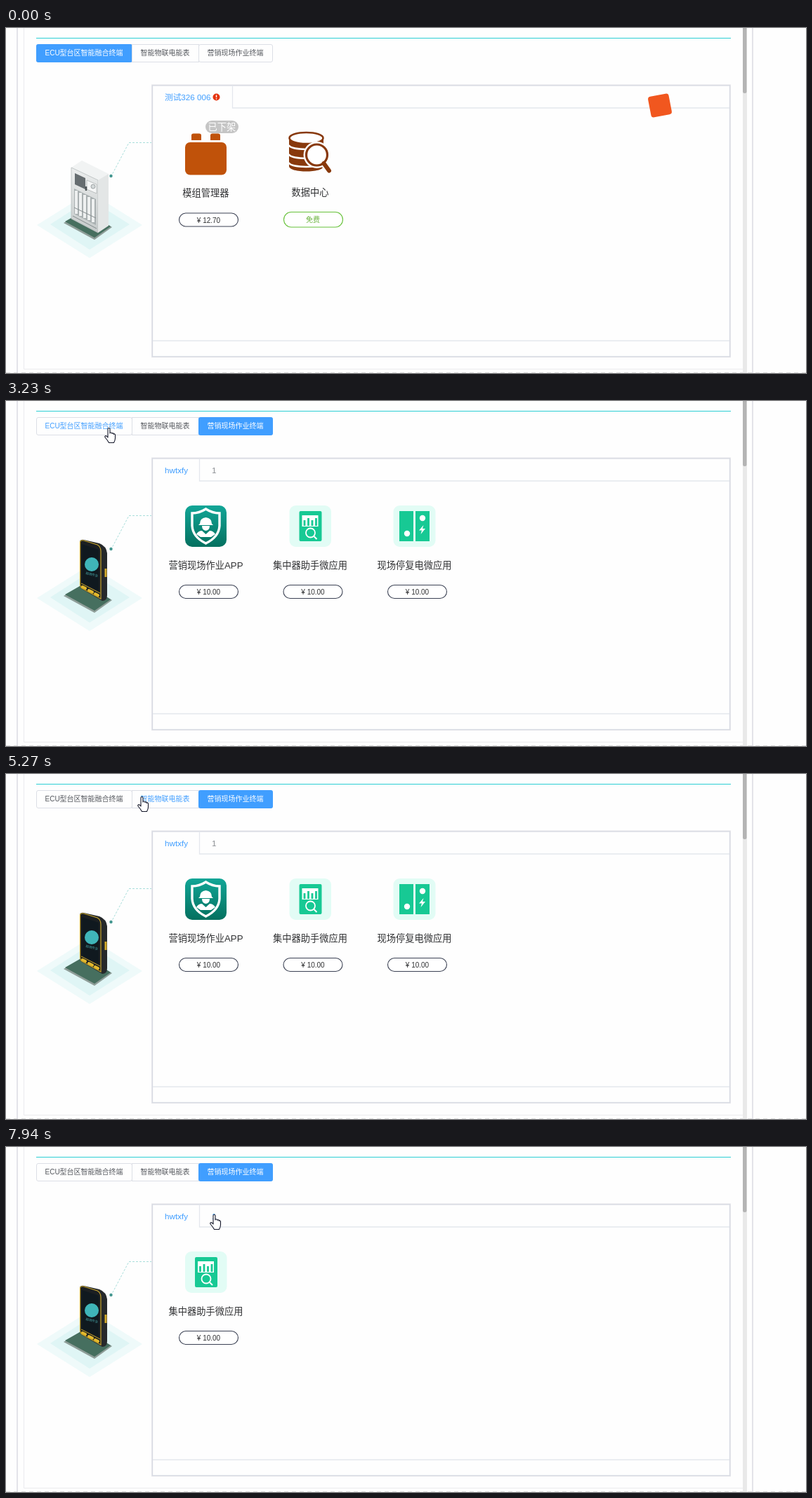
An HTML page that plays this animation: 1139x492 px, repeating every 8 s.

```html
<!DOCTYPE html>
<html lang="zh-CN">
<head>
<meta charset="utf-8">
<title>终端应用</title>
<style>
html, body { margin: 0; width: 100%; height: 100%; overflow: hidden; background: #fefefe; }
svg { display: block; width: 1139px; height: 492px; }
text { font-family: "Liberation Sans", "Noto Sans CJK SC", sans-serif; fill: #303133; }
.s { font-size: 10px; }
.m { font-size: 11.67px; }
.l { font-size: 13.25px; }
.c { text-anchor: middle; }
.line { fill: none; stroke: #e4e7ed; }
.faint { fill: none; stroke: #ebebee; }
.teal { stroke: #2ccfd3; }
.pill { fill: #fff; stroke: #3c4254; stroke-width: 1.1; }
.blue { fill: #409eff; }
.green { fill: #17c994; }
.box { fill: #fefefe; stroke: #c3c3c3; }
.cur { fill: #fff; stroke: #15182a; stroke-width: 1.1; stroke-linejoin: round; }
</style>
</head>
<body>
<svg viewBox="0 0 1139 492">
<defs>
  <linearGradient id="shade" x2="0" y2="1"><stop stop-color="#12a697"/><stop offset="1" stop-color="#04705f"/></linearGradient>
  <linearGradient id="steel" x2="0" y2="1"><stop stop-color="#eceeee"/><stop offset="1" stop-color="#c5caca"/></linearGradient>
  <g id="db">
    <path d="M.5 9v40c0 10 49 10 49 0V9z" fill="#88390c"/>
    <ellipse cx="25" cy="9" rx="24" ry="8" fill="#fff" stroke="#88390c" stroke-width="2.6"/>
    <path d="M0 19c4 8 46 8 50 0M0 32c4 8 46 8 50 0M0 44c4 8 46 8 50 0" fill="none" stroke="#fff" stroke-width="2.4"/>
    <path d="M50 44L58 56" stroke="#fff" stroke-width="11"/>
    <circle cx="40" cy="33" r="19" fill="#fff"/>
    <circle cx="40" cy="33" r="15" fill="#fff" stroke="#88390c" stroke-width="3.2"/>
    <path d="M50 45L57.500 55.500" stroke="#88390c" stroke-width="6" stroke-linecap="round"/>
  </g>
  <g id="call">
    <path d="M10 54Q44 47 53 11" fill="none" stroke="currentColor" stroke-width="10"/>
    <path d="M42 7L53 1Q58-1 60 3Q61 12 57 21L50 26Q43 23 41 11Z"/>
    <path d="M1 51L11 41Q14 39 17 41L26 48Q22 57 10 60Q2 60 1 55Z"/>
  </g>
  <g id="none">
    <rect x=".5" y=".5" width="59" height="59" class="box"/>
    <rect x="2.500" y="2.500" width="12" height="12" class="box"/>
  </g>
  <g id="meter">
    <rect width="59.500" height="59" rx="9" fill="#e2fcf5"/>
    <rect x="14" y="8" width="32" height="43" rx="2" class="green"/>
    <path d="M18 14h23v16H18z" fill="#fff"/>
    <path d="M21.500 29V21M27 29V18M32.500 29V21M38 29V18" stroke="#17c994" stroke-width="2.800"/>
    <circle cx="30" cy="39" r="6.500" fill="none" stroke="#fff" stroke-width="1.800"/>
    <path d="M35 44l4 4" stroke="#fff" stroke-width="2"/>
  </g>
  <g id="price">
    <rect x="-42" y="-9.500" width="84" height="19" rx="9.500" class="pill"/>
    <text class="s c" y="4">¥ 10.00</text>
  </g>
  <g id="helper">
    <use href="#meter" x="-29.500" y="149"/>
    <text class="l c" y="238.500">集中器助手微应用</text>
    <use href="#price" y="272"/>
  </g>
</defs>

<rect width="1139" height="492" fill="#fefefe"/>
<path d="M16 0V492M1063 0V492" stroke="#e3e3e9" stroke-width="2"/>
<path d="M0 491.500H1139" stroke="#dedede" stroke-dasharray="6 5"/>
<path d="M43 14.500H1032" class="teal"/>
<rect x="1049" width="6" height="492" fill="#e9e9e9"/>
<rect id="thumb" x="1049" y="-10" width="5.500" rx="2.500" fill="#b4b4b4"/>

<g id="tabs"></g>

<!-- device -->
<path d="M44 281L119 234L194 281L119 328Z" fill="#effafa"/>
<path d="M63 280L119 244L176 280L119 316Z" fill="#dff5f5"/>
<path d="M208 163.500H175L150 211" fill="none" stroke="#a9dedb" stroke-dasharray="3 2"/>
<circle cx="149.500" cy="211" r="2.200" fill="#43968f"/>
<path d="M82 278L112 260L151 284L126 302Z" fill="#8e9d98"/>
<path d="M84 276L112 260L149 283L126 299Z" fill="#466f5f"/>
<g id="cabinet">
  <path d="M93 199L108 189L146 208L131 217Z" fill="#f1f3f3"/>
  <path d="M93 199L131 217V292L93 272Z" fill="url(#steel)" stroke="#b5bcbc" stroke-width=".8"/>
  <path d="M131 217L146 208V282L131 292Z" fill="#e3e6e6"/>
  <path d="M98 207L113 214V230L98 223Z" fill="#666d70"/>
  <path d="M115 217L129 223V236L115 230Z" fill="#f5f6f6" stroke="#a6adad" stroke-width=".7"/>
  <circle cx="124" cy="226" r="3" fill="#d4d9d9" stroke="#848b8d" stroke-width=".7"/>
  <path d="M114 226v6" stroke="#4d5457" stroke-width="2.500"/>
  <path d="M97 229L128 244V281L97 265Z" fill="#a9b0b1"/>
  <path d="M100 232v33M106 235v33M112 238v33M118 241v33M124 244v33" stroke="#eef0f0" stroke-width="4"/>
  <path d="M97 256L128 271M95 268L129 286" stroke="#858c8e"/>
</g>
<g id="phone">
  <path d="M105 202Q105 197 111 198L133 203Q143 207 144 217V277Q144 285 137 285L108 268Q105 266 105 263Z" fill="#26292b"/>
  <path d="M105.500 201Q106 198 111 199L130 205Q135 208 135 214V282L108 267Q105.500 265 105.500 261Z" fill="#1b1f22" stroke="#c7a42c" stroke-width="1.200"/>
  <path d="M108 204L132 212V271L108 259Z" fill="#10191f"/>
  <path d="M107 260L134 274" stroke="#c7a42c"/>
  <circle cx="122" cy="233" r="10" fill="#3fb5b9"/>
  <text x="113" y="249" font-size="4.500" style="fill:#4aa9aa" transform="rotate(12 122 248)">现场作业</text>
  <path d="M109 265l4 2M118 270l5 2.500M127 275l4 2" stroke="#e4b92c" stroke-width="4" stroke-linecap="round"/>
  <path d="M142 239v12" stroke="#d2aa2c" stroke-width="3"/>
</g>

<!-- tall panel -->
<g id="full">
  <path d="M25.500 0V486.500H1049" class="faint"/>
  <rect x="208.500" y="82" width="822" height="386.500" fill="none" stroke="#e7e7ec" stroke-width="3"/>
  <rect x="208.500" y="82" width="822" height="386.500" fill="#fefefe" stroke="#d8dbe3" stroke-width="1.300"/>
  <path d="M209 446H1030" class="line" stroke-width="1.500"/>
</g>

<g id="ecu">
  <path d="M322.500 82V114H1030" class="line" stroke-width="1.300"/>
  <text x="226" y="103" class="m blue">测试326 006</text>
  <circle cx="299.500" cy="98.500" r="5" fill="#e5340e"/>
  <path d="M299.500 95.500v3.500M299.500 100.200v1.500" stroke="#fff" stroke-width="1.400"/>
  <path d="M264 160V153Q264 150.500 267 150.500H275Q278 150.500 278 153V160ZM291 160V153Q291 150.500 294 150.500H302Q305 150.500 305 153V160Z" fill="#c0520a"/>
  <rect x="255" y="163" width="59" height="46.500" rx="7" fill="#c0520a"/>
  <rect x="284" y="132" width="47" height="18" rx="9" fill="#c5c5c5"/>
  <text x="307.500" y="146" class="l c" style="fill:#fff">已下架</text>
  <text x="284.500" y="240" class="l c">模组管理器</text>
  <rect x="246.500" y="264" width="84" height="19" rx="9.500" class="pill"/>
  <text x="288.500" y="277.500" class="s c">¥ 12.70</text>
  <use href="#db" x="402.500" y="148"/>
  <text x="433" y="238.500" class="l c">数据中心</text>
  <rect x="395.500" y="262.500" width="84" height="21.500" rx="10.700" class="pill" style="stroke:#67c23a"/>
  <text x="437" y="277" class="s c" style="fill:#67b23a">免费</text>
</g>

<g id="field">
  <path d="M275.500 82V114H1030" class="line" stroke-width="1.300"/>
  <text x="226" y="103" class="m blue">hwtxfy</text>
  <text id="one" x="293" y="103" class="m">1</text>
  <g id="apps">
    <rect x="255" y="149" width="59" height="59" rx="10" fill="url(#shade)"/>
    <path d="M284.500 154Q294 160 304 160V178Q303 194 284.500 203Q266 194 265 178V160Q275 160 284.500 154Z" fill="none" stroke="#fff" stroke-width="3.400"/>
    <path d="M276 175Q276 167 284.500 166Q293 167 293 175L295 177H274Z" fill="#fff"/>
    <path d="M279 178H290Q290 184 284.500 185Q279 184 279 178ZM271 190Q274 185 279 185L284.500 190L290 185Q295 185 298 190L292 194H277Z" fill="#fff"/>
    <text x="284.500" y="238.500" class="l c">营销现场作业APP</text>
    <use href="#price" x="288.500" y="272"/>
    <use href="#meter" x="403.500" y="149"/>
    <text x="433" y="238.500" class="l c">集中器助手微应用</text>
    <use href="#price" x="437" y="272"/>
    <rect x="551.500" y="149" width="60" height="59" rx="9" fill="#e2fcf5"/>
    <path d="M560 157h20v43h-20zM583 157h20v43h-20z" class="green"/>
    <circle cx="571" cy="189" r="4.200" fill="#fff"/>
    <circle cx="593" cy="167" r="4.200" fill="#fff"/>
    <path d="M594.500 177L588 184.500H592L590.500 190L597 182H593Z" fill="#fff"/>
    <text x="581.500" y="238.500" class="l c">现场停复电微应用</text>
    <use href="#price" x="585.500" y="272"/>
  </g>
  <g id="solo">
    <use href="#meter" x="255" y="149"/>
    <text x="284.500" y="238.500" class="l c">集中器助手微应用</text>
    <use href="#price" x="288.500" y="272"/>
  </g>
</g>

<!-- empty panel and the list below it -->
<g id="empty">
  <path d="M25.500 0V345.500H1049" class="faint"/>
  <rect x="208" y="82" width="823" height="246" class="faint"/>
  <path d="M207.500 83H1031.500" stroke="#dcdde4" stroke-width="4"/>
  <path d="M208 86H1031" stroke="#ececf0" stroke-width="2"/>
  <path d="M26 363.500L38 357L36 368L32.500 366L30 368.500V364.500L35 360L29 364.500Z" fill="#303133"/>
  <text x="42" y="368" class="l" font-weight="500">最新上架</text>
  <path d="M25 386.500H1050" class="teal"/>
  <text x="67" y="418" class="l" font-weight="500">ECU型台区智能融合终端APP</text>
  <text x="961" y="419" class="m" style="fill:#505256">查看更多</text>
  <path d="M1014.500 409L1019.500 414L1014.500 419" fill="none" stroke="#777"/>
  <circle cx="116" cy="463" r="19.500" fill="#a9dcfa"/>
  <circle cx="116" cy="463" r="7" fill="#75c0ee"/>
  <path d="M75 437h41v51H75z" fill="#a3a5ea"/>
  <path d="M75 437h5v51h-5z" fill="#8d90df"/>
  <circle cx="95.500" cy="462" r="16.500" fill="#e9f0f2"/>
  <text x="95.500" y="468" class="c" font-size="17" font-weight="bold" style="fill:#4b5964" textLength="0">OS</text>
  <use href="#none" x="171" y="431"/>
  <use href="#none" x="267" y="431"/>
  <use href="#none" x="458" y="431"/>
  <g fill="none" stroke="#c6cbca">
    <path d="M378 455H384M384 437V478M384 437H408M384 444H402M384 452H405M384 460H392M392 460V488M392 464H418M392 470H412M392 476H416M392 482H410M392 488H414"/>
    <path d="M366 455H380" stroke="#ec8d4e" stroke-width="3"/>
    <path d="M383 437h10M383 444h10M383 452h10M383 460h10" stroke="#62c79b" stroke-width="2.500"/>
    <path d="M396 464h6M396 470h6M396 476h6M396 482h6M405 463v26" stroke="#9aa09e" stroke-width="2"/>
  </g>
  <use href="#call" x="554" y="431" fill="#ee7d2f" color="#ee7d2f"/>
  <use href="#db" x="649.500" y="431"/>
  <g id="gear" transform="translate(775.500 461)" fill="#2c6ca8">
    <circle r="16.500" fill="none" stroke="#2c6ca8" stroke-width="14"/>
  </g>
  <use href="#call" x="841" y="431" fill="#2c6ca8" color="#2c6ca8"/>
  <g fill="#0e7c86" stroke="#fefefe" stroke-width="2">
    <circle cx="949" cy="447" r="9.500"/><circle cx="984" cy="447" r="9.500"/>
    <path d="M936 485V470Q937 457 949 457T962 470V485ZM971 485V470Q972 457 984 457T997 470V485Z"/>
    <path d="M948 491V479Q950 463 966.500 463T985 479V491Z"/>
    <ellipse cx="966.500" cy="446.500" rx="13" ry="16"/>
  </g>
</g>

<rect id="badge" x="916" y="95.500" width="30" height="30" rx="4" fill="#f1571f" transform="rotate(-11 931 110.500)"/>

<path id="arrow" class="cur" d="M.5 .5V14.500L3.800 11.500L6.200 16.500L8.500 15.500L6.200 10.500H10.300Z"/>
<path id="hand" class="cur" d="M-1 13V2Q-1 .5 .5 .5T2 2V8Q2 6.800 3.500 7T5 8.500Q5 7.600 6.300 7.900T7.400 9.500Q7.600 8.700 8.600 9T9.500 10.500V15Q9.500 18 7.500 21.500H.5Q-1 18.500 -4.500 14.500Q-6 12.500 -4.500 11.800T-1 14Z"/>
</svg>

<script>
const LOOP = 8000, FADE = 300;
const $ = id => document.getElementById(id);
const show = (id, on) => $(id).style.display = on ? '' : 'none';
const mix = (a, b, w) => `rgb(${a.map((v, i) => Math.round(v + (b[i] - v) * w))})`;

const labels = ['ECU型台区智能融合终端', '智能物联电能表', '营销现场作业终端'];
const edges = [43, 179, 274, 379];
const GREY = [84, 87, 93], BLUE = [64, 158, 255], WHITE = [255, 255, 255];

// time, selected tab
const clicks = [[-FADE, 0], [2500, 2], [3350, 0], [4000, 2], [4620, 1], [4950, 2], [5420, 0], [6250, 2]];
// time, x, y of the pointer's hot spot
const path = [
  [760, 670, 466], [1535, 437, 208], [1767, 349, 119], [2000, 325, 36], [2150, 322, 24], [2700, 325, 32],
  [3200, 146, 38], [3500, 146, 38], [3900, 325, 38], [4200, 325, 38], [4500, 228, 38], [4650, 228, 38],
  [4865, 320, 36], [5050, 320, 36], [5360, 128, 30], [5600, 127, 33], [5850, 127, 33], [6170, 320, 36],
  [6330, 320, 36], [6650, 315, 64], [6727, 315, 66], [6960, 300, 98], [7150, 288, 84], [7329, 288, 84],
  [7330, 298, 88], [7939, 298, 88], [7940, 296, 96]
];

$('tabs').innerHTML = labels.map((s, i) => {
  const x = edges[i], w = edges[i + 1] - x;
  return `<rect x="${x + .5}" y="23.500" width="${w}" height="25" rx="${i == 1 ? 0 : 2.5}" fill="#fefefe" stroke="#dcdfe6"/>
    <rect class="blue" x="${x}" y="23" width="${w + 1}" height="26" rx="${i == 1 ? 0 : 3}"/>
    <text class="s" x="${x + 12.5}" y="39">${s}</text>`;
}).join('');
const fills = document.querySelectorAll('#tabs .blue'), names = document.querySelectorAll('#tabs text');

for (let a = 0; a < 360; a += 45)
  $('gear').innerHTML += `<rect x="-6" y="-30" width="12" height="12" rx="3" transform="rotate(${a})"/>`;
document.querySelector('[textLength]').removeAttribute('textLength');

function pointer(t) {
  // the pointer is sampled at a coarse, even rate while it travels
  const q = t < 7200 ? 760 + Math.floor((t - 740) / 77.5) * 77.5 : t;
  let i = path.findIndex(p => p[0] > q);
  if (i < 0) return path[path.length - 1].slice(1);
  i = Math.max(i, 1);
  const [a, b] = [path[i - 1], path[i]];
  const f = Math.max(0, (q - a[0]) / (b[0] - a[0]));
  return [1, 2].map(k => Math.round(a[k] + (b[k] - a[k]) * f));
}

function draw(t) {
  const visible = t >= 760;
  const [x, y] = visible ? pointer(t) : [-99, -99];
  const k = clicks.filter(c => c[0] <= t).length - 1;
  const tab = clicks[k][1], last = k ? clicks[k - 1][1] : -1;
  const fade = Math.min(1, (t - clicks[k][0]) / FADE);
  const w = fade * fade * (3 - 2 * fade);

  labels.forEach((_, i) => {
    const on = i == tab ? w : i == last ? 1 - w : 0;
    const hover = y >= 23 && y < 49 && x >= edges[i] && x < edges[i + 1];
    fills[i].style.opacity = on;
    names[i].style.fill = mix(hover && i != tab ? BLUE : GREY, WHITE, on);
  });

  const overTabs = y >= 21 && y < 49 && x >= 43 && x < 379;
  const overInner = y >= 82 && y < 114 && x >= 209 && x < 316;
  const second = t >= 7940;
  show('cabinet', tab == 0);
  show('phone', tab != 0);
  show('full', tab != 1);
  show('empty', tab == 1);
  show('ecu', tab == 0);
  show('field', tab == 2);
  show('apps', !second);
  show('solo', second);
  show('badge', t < 2080);
  $('one').style.fill = overInner && x > 276 ? '#409eff' : '#8c8f94';
  $('thumb').setAttribute('height', tab == 1 ? 116 : 103);

  const hand = overTabs || overInner;
  show('hand', visible && hand);
  show('arrow', visible && !hand);
  $(hand ? 'hand' : 'arrow').setAttribute('transform', `translate(${x} ${y})`);
}

function tick() {
  draw(performance.now() % LOOP);
  requestAnimationFrame(tick);
}
tick();
</script>
</body>
</html>
```
